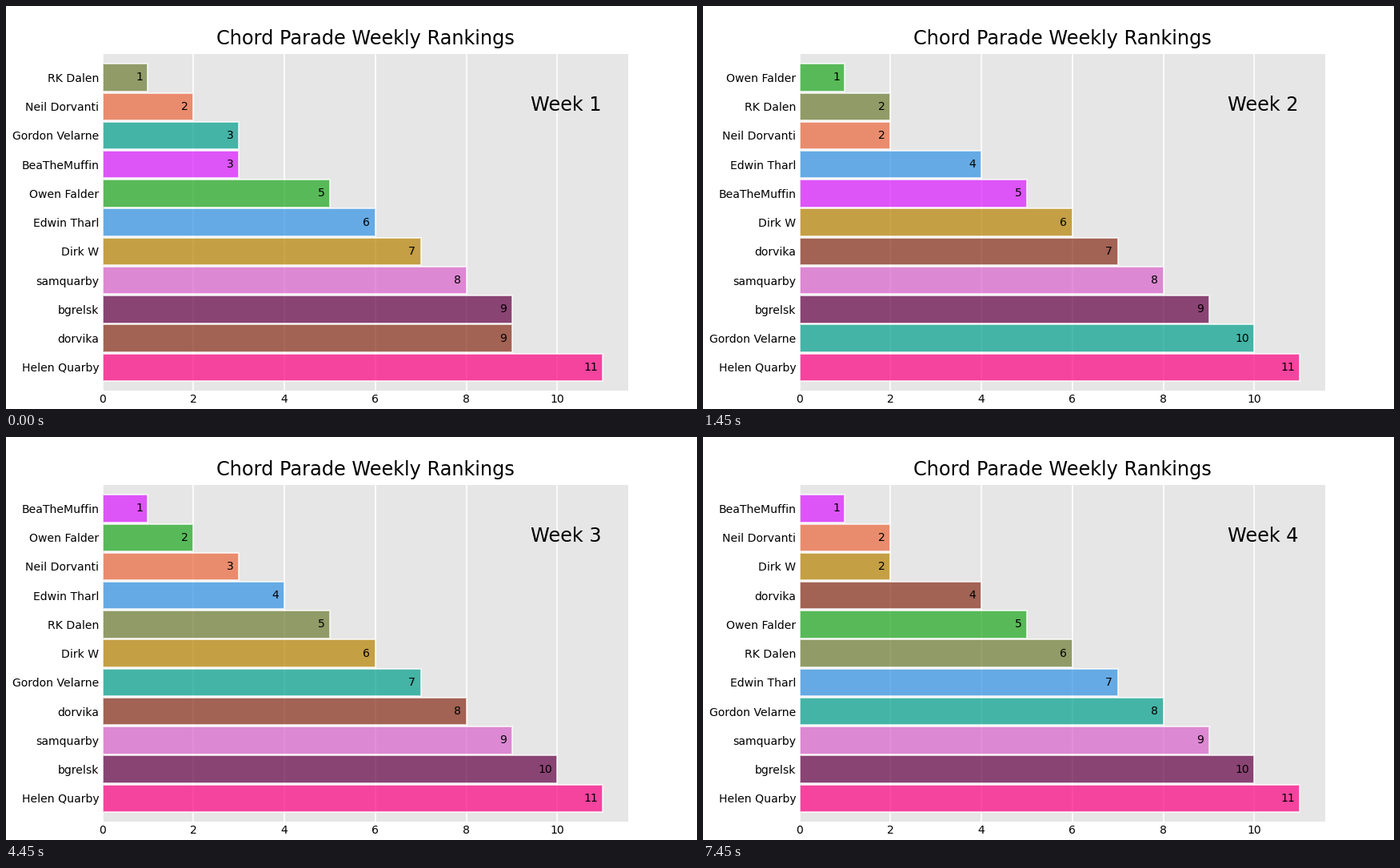
These frames come from a looping animation (864 by 504 pixels, 8000 ms). A matplotlib script:

```python
import matplotlib.pyplot as plt
import numpy as np
from matplotlib.animation import FuncAnimation

W, H, DPI = 864, 504, 144
INTERVAL, FRAMES = 50, 160
STEPS = 20                  # frames per move from one week to the next
STARTS = (9, 69, 129)       # last still frame before each move

# name, colour, place in each of the four weeks (1 = top row)
PLAYERS = [
    ("Edwin Tharl", "#2E91E5", (6, 4, 4, 7)),
    ("Owen Falder", "#1CA71C", (5, 1, 2, 5)),
    ("BeaTheMuffin", "#DA16FF", (4, 5, 1, 1)),
    ("Dirk W", "#B68100", (7, 6, 6, 3)),
    ("Neil Dorvanti", "#EB663B", (2, 3, 3, 2)),
    ("Gordon Velarne", "#00A08B", (3, 10, 7, 8)),
    ("Helen Quarby", "#FC0080", (11, 11, 11, 11)),
    ("RK Dalen", "#6C7C32", (1, 2, 5, 6)),
    ("dorvika", "#862A16", (10, 7, 8, 4)),
    ("bgrelsk", "#620042", (9, 9, 10, 10)),
    ("samquarby", "#DA60CA", (8, 8, 9, 9)),
]
# week index and place of those who share the score of the row above
TIES = [(0, 4), (0, 10), (1, 3), (3, 3)]

names, colors, places = zip(*PLAYERS)
places = np.array(places, float).T
scores = places.copy()
for week, place in TIES:
    scores[week][places[week] == place] -= 1
n = len(names)
rows = n + 1 - places

fig = plt.figure(figsize=(W / DPI, H / DPI), dpi=DPI, facecolor="white")
left, right, bottom, top = 120.5 / W, 0.9, 23.1 / H, 0.88
ax = fig.add_axes([left, bottom, right - left, top - bottom], facecolor="0.9")
ax.set_xlim(0, n * 1.05)
ax.set_ylim(0.2, n + 0.8)
ax.set_yticks([])
ax.set_xticks(range(0, 11, 2))
ax.tick_params(labelsize=7, length=0, pad=2)
ax.set_axisbelow(True)
ax.grid(True, axis="x", color="white")
ax.spines[:].set_visible(False)
ax.set_title("Chord Parade Weekly Rankings", fontsize=12)

bars = ax.barh(rows[0], scores[0], height=0.95, color=colors,
               edgecolor="white", linewidth=1, alpha=0.7)
ax.set_xlim(0, n * 1.05)
ax.set_ylim(0.2, n + 0.8)

trans, va, ha = ax.get_yaxis_text1_transform(2)
name_texts = [ax.text(0, 0, s, fontsize=7, va=va, ha=ha, transform=trans)
              for s in names]
value_texts = [ax.text(0, 0, "", fontsize=7, va="center", ha="right")
               for _ in names]
week_text = ax.text(0.95, 0.85, "", fontsize=12, va="center", ha="right",
                    transform=ax.transAxes)
gap = 0.01 * n * 1.05


def blend(table, t):
    i = min(int(t), len(table) - 2)
    return table[i] + (table[i + 1] - table[i]) * (t - i)


def update(frame):
    steps = sum(min(max(frame - s, 0), STEPS) for s in STARTS)
    t = steps / STEPS
    state = zip(bars, name_texts, value_texts, blend(rows, t), blend(scores, t))
    for bar, name, value, y, x in state:
        bar.set_width(x)
        bar.set_y(y - bar.get_height() / 2)
        name.set_y(y)
        value.set_position((x - gap, y))
        value.set_text(f"{x:.0f}")
    week_text.set_text(f"Week {steps // STEPS + 1}")
    return [*bars, *name_texts, *value_texts, week_text]


anim = FuncAnimation(fig, update, frames=FRAMES, interval=INTERVAL,
                     init_func=lambda: update(0), repeat=True, repeat_delay=0)
plt.show()
```
